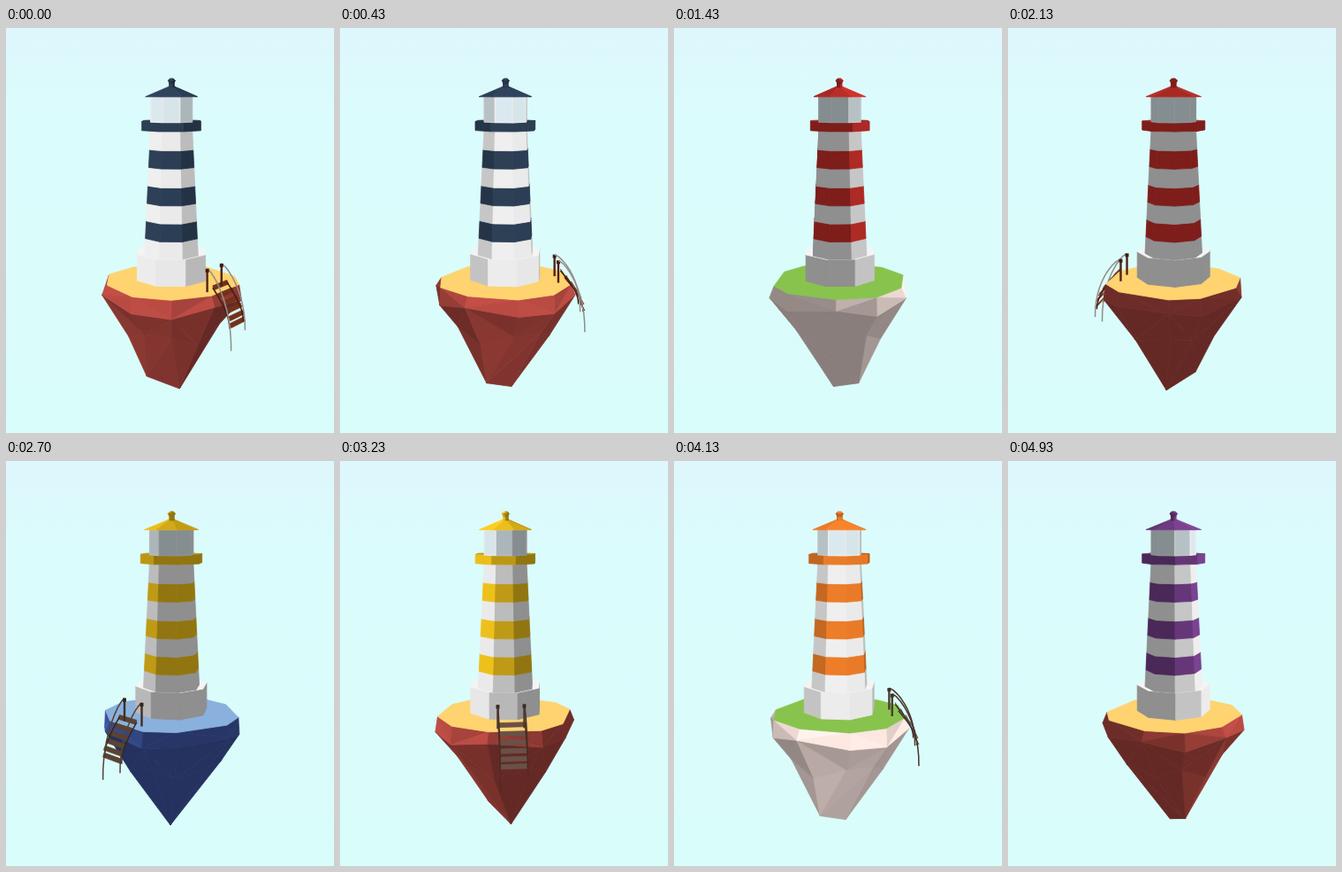
An HTML page with a canvas that plays this animation: 371x457 px, repeating every 4.96 s.

```html
<!DOCTYPE html>
<html lang="en">
<head>
<meta charset="utf-8">
<title>Floating lighthouse</title>
<style>
  html, body { margin: 0; width: 100%; height: 100%; overflow: hidden; }
  body { background: linear-gradient(#def7fd, #dbfcfc 22%, #d9fdfa); }
  canvas { display: block; width: 371px; height: 457px; }
</style>
</head>
<body>
<canvas id="stage"></canvas>
<script>
const LOOP = 4960, SLOTS = 9, TURN = 480;
const RAD = Math.PI / 180, TAU = Math.PI * 2;
// Pinhole camera: horizon height, distance and horizontal centre
const EYE_Y = 70, DIST = 800, MID_X = 187.3;

const PAINT = [[46, 65, 88], [214, 52, 46], [248, 200, 28], [242, 128, 42], [126, 68, 148]];
const WHITE = [245, 244, 244], GLASS = [226, 241, 247];
const SAND = { top: [254, 211, 112], rock: [188, 76, 68] };
const LANDS = {
  sand: { ...SAND, wood: [165, 70, 40], rope: [210, 200, 195] },
  dune: { ...SAND, wood: [150, 116, 102], rope: [112, 62, 48] },
  ice: { top: [138, 176, 221], rock: [68, 92, 176], wood: [128, 96, 74], rope: [120, 96, 80] },
  grass: { top: [136, 195, 78], rock: [255, 234, 228], wood: [150, 124, 100], rope: [104, 74, 60] }
};
const ORDER = ['sand', 'ice', 'grass', 'sand', 'ice', 'dune', 'ice', 'grass', 'sand'];

const canvas = document.getElementById('stage');
const ctx = canvas.getContext('2d');
const dpr = window.devicePixelRatio || 1;
canvas.width = 371 * dpr;
canvas.height = 457 * dpr;

let spin = 0, light = [0, 0, 1];

const polar = (r, y, az) => [r * Math.sin(az + spin), y, r * Math.cos(az + spin)];
const rgb = (c, k = 1) => `rgb(${c.map(v => Math.min(255, Math.round(v * k))).join()})`;
const sub = (a, b) => a.map((v, i) => v - b[i]);
const dot = (a, b) => a[0] * b[0] + a[1] * b[1] + a[2] * b[2];
const cross = (a, b) => [
  a[1] * b[2] - a[2] * b[1], a[2] * b[0] - a[0] * b[2], a[0] * b[1] - a[1] * b[0]];

function project([x, y, z]) {
  const s = DIST / (DIST - z);
  return [MID_X + x * s, EYE_Y + (y - EYE_Y) * s];
}

function trace(pts) {
  ctx.beginPath();
  pts.forEach(p => ctx.lineTo(...project(p)));
}

function fill(pts, color, edge = color, width = 0.8) {
  trace(pts);
  ctx.closePath();
  ctx.fillStyle = color;
  ctx.fill();
  ctx.strokeStyle = edge;
  ctx.lineWidth = width;
  ctx.stroke();
}

function line(pts, color, width) {
  trace(pts);
  ctx.strokeStyle = color;
  ctx.lineWidth = width;
  ctx.stroke();
}

const shade = n => 0.585 + 0.5 * Math.max(0, (dot(n, light) + 0.15) / 1.15);

// Outward unit normal, or null when the face looks away from the camera
function facing(pts, axisY) {
  let n = cross(sub(pts[1], pts[0]), sub(pts[2], pts[0]));
  const size = Math.hypot(...n) || 1;
  const mid = [0, 1, 2].map(i => pts.reduce((sum, p) => sum + p[i], 0) / pts.length);
  const sign = dot(n, sub(mid, [0, axisY, 0])) < 0 ? -1 : 1;
  n = n.map(v => v * sign / size);
  return dot(n, sub([0, EYE_Y, DIST], mid)) > 0 ? n : null;
}

const OCT = 21 * RAD;
const octagon = (r, y) => Array.from({ length: 8 }, (_, i) => polar(r, y, OCT + i * TAU / 8));

function prism(r1, y1, r2, y2, color, edge, width) {
  const a = octagon(r1, y1), b = octagon(r2, y2);
  for (let i = 0; i < 8; i++) {
    const j = (i + 1) % 8, pts = [a[i], a[j], b[j], b[i]];
    const n = facing(pts, (y1 + y2) / 2);
    if (n) fill(pts, rgb(color, shade(n)), edge && rgb(edge, shade(n)), width);
  }
}

// Island: a jagged rim below the flat top, then a body narrowing to a high and a low tip
const N = 10;
const wobble = (i, seed) => Math.sin(i * 2.7 + seed * 1.9);
const ring = (r, y, dr, dy, seed) => Array.from({ length: N }, (_, i) => [
  r + dr * wobble(i, seed),
  y + dy * wobble(i, seed + 2),
  (i + 0.16 * wobble(i, 5)) * TAU / N
]);
const RINGS = [
  ring(75.5, 284.5, 1.5, 0, 1),
  ring(79, 299, 2, 5, 2),
  ring(53, 336, 4, 7, 4)
];
const TIPS = [[9, 407, 90 * RAD], [28, 393, -90 * RAD]];

function islandFaces() {
  const rings = RINGS.map(r => r.map(v => polar(...v)));
  const tips = TIPS.map(v => polar(...v));
  const faces = [];
  for (let i = 0; i < N; i++) {
    const j = (i + 1) % N;
    for (let k = 0; k < 2; k++) {
      const [a, b, c, d] = [rings[k][i], rings[k][j], rings[k + 1][j], rings[k + 1][i]];
      if ((i + k) % 2) faces.push([a, b, c], [a, c, d]);
      else faces.push([a, b, d], [b, c, d]);
    }
    const low = rings[2], tip = tips[i < N / 2 ? 0 : 1], next = tips[j < N / 2 ? 0 : 1];
    faces.push([low[i], low[j], tip]);
    if (tip !== next) faces.push([low[j], tip, next]);
  }
  return { faces, top: rings[0] };
}

function drawIsland(land) {
  const { faces, top } = islandFaces();
  const depth = f => f.reduce((sum, p) => sum + p[2], 0) / f.length;
  faces.sort((a, b) => depth(a) - depth(b)).forEach(f => {
    const n = facing(f, 320);
    if (n) fill(f, rgb(land.rock, shade(n) * (n[1] > 0.25 ? 0.92 : 1)));
  });
  fill(top, rgb(land.top));
}

// Ladder: points given by radius, height and sideways offset
const LADDER = 53 * RAD;
function rung(r, y, side) {
  const a = LADDER + spin, s = Math.sin(a), c = Math.cos(a);
  return [r * s + side * c, y, r * c - side * s];
}

function drawPosts(land, k) {
  for (const side of [-14, 14]) {
    line([rung(58, 285, side), rung(58, 261, side)], rgb(land.wood, k * 0.7), 2.4);
    line([rung(58, 264, side), rung(58, 260, side)], rgb(land.wood, k * 0.55), 4);
  }
}

function drawSteps(land, k) {
  for (let i = 0; i < 6; i++) {
    const u = i / 5, r = 65 + 21 * Math.sin(u * 1.57), y = 277 + 36 * u;
    fill([rung(r, y, -14), rung(r, y, 14), rung(r + 2, y + 4, 14), rung(r + 2, y + 4, -14)],
      rgb(land.wood, k));
  }
  for (const side of [-14, 14]) {
    const rope = [], beam = [];
    for (let u = 0; u <= 1.01; u += 0.1) {
      const r = 58 + 30 * Math.sin(u * 1.6);
      rope.push(rung(r, 260 + (74 - side * 0.5) * u ** 1.4, side));
      beam.push(rung(65 + 21 * Math.sin(u * 1.57), 279 + 39 * u, side));
    }
    line(beam, rgb(land.wood, k * 0.6), 1.5);
    line(rope, rgb(land.rope, k), 1.5);
  }
}

function drawTower(paint) {
  const plinthTop = octagon(41, 252);
  prism(41, 252, 41, 281, WHITE);
  fill(plinthTop, rgb(WHITE));

  const cuts = [254, 235.2, 215.8, 196.3, 176.8, 156.3, 136.5, 116];
  const width = y => 25.4 + 0.05 * (y - 117);
  for (let i = 0; i < 7; i++) {
    const lo = cuts[i], hi = cuts[i + 1];
    prism(width(hi), hi, width(lo), lo, i % 2 ? paint : WHITE);
  }

  fill(octagon(35.5, 105), rgb(paint, 0.75));
  prism(35.5, 105, 35.5, 115, paint);
  prism(25, 78, 25, 105.5, GLASS, WHITE, 1.6);

  prism(3, 66, 31.3, 77.5, paint);
  prism(2.8, 61, 3, 67, paint);
  prism(2, 57, 4.2, 59.3, paint);
  prism(4.2, 59.3, 2.6, 62.5, paint);
}

function draw(now) {
  const t = now % LOOP;
  const slot = Math.min(SLOTS - 1, Math.floor(t / LOOP * SLOTS));
  const land = LANDS[ORDER[slot]];
  const paint = PAINT[slot >> 1];

  spin = t / LOOP * TURN * RAD;
  const az = spin - 28 * RAD, up = 40 * RAD;
  light = [Math.cos(up) * Math.sin(az), -Math.sin(up), Math.cos(up) * Math.cos(az)];

  ctx.setTransform(dpr, 0, 0, dpr, 0, 0);
  ctx.clearRect(0, 0, 371, 457);
  ctx.lineJoin = 'round';

  const out = LADDER + spin, front = Math.cos(out);
  const k = shade([Math.sin(out), 0, front]);
  if (front < -0.15) drawSteps(land, k);
  drawIsland(land);
  if (front < 0) drawPosts(land, k);
  if (front >= -0.15 && front < 0) drawSteps(land, k);
  drawTower(paint);
  if (front >= 0) {
    drawSteps(land, k);
    drawPosts(land, k);
  }
}

const start = performance.now();
function tick() {
  draw(performance.now() - start);
  requestAnimationFrame(tick);
}
tick();
</script>
</body>
</html>
```
